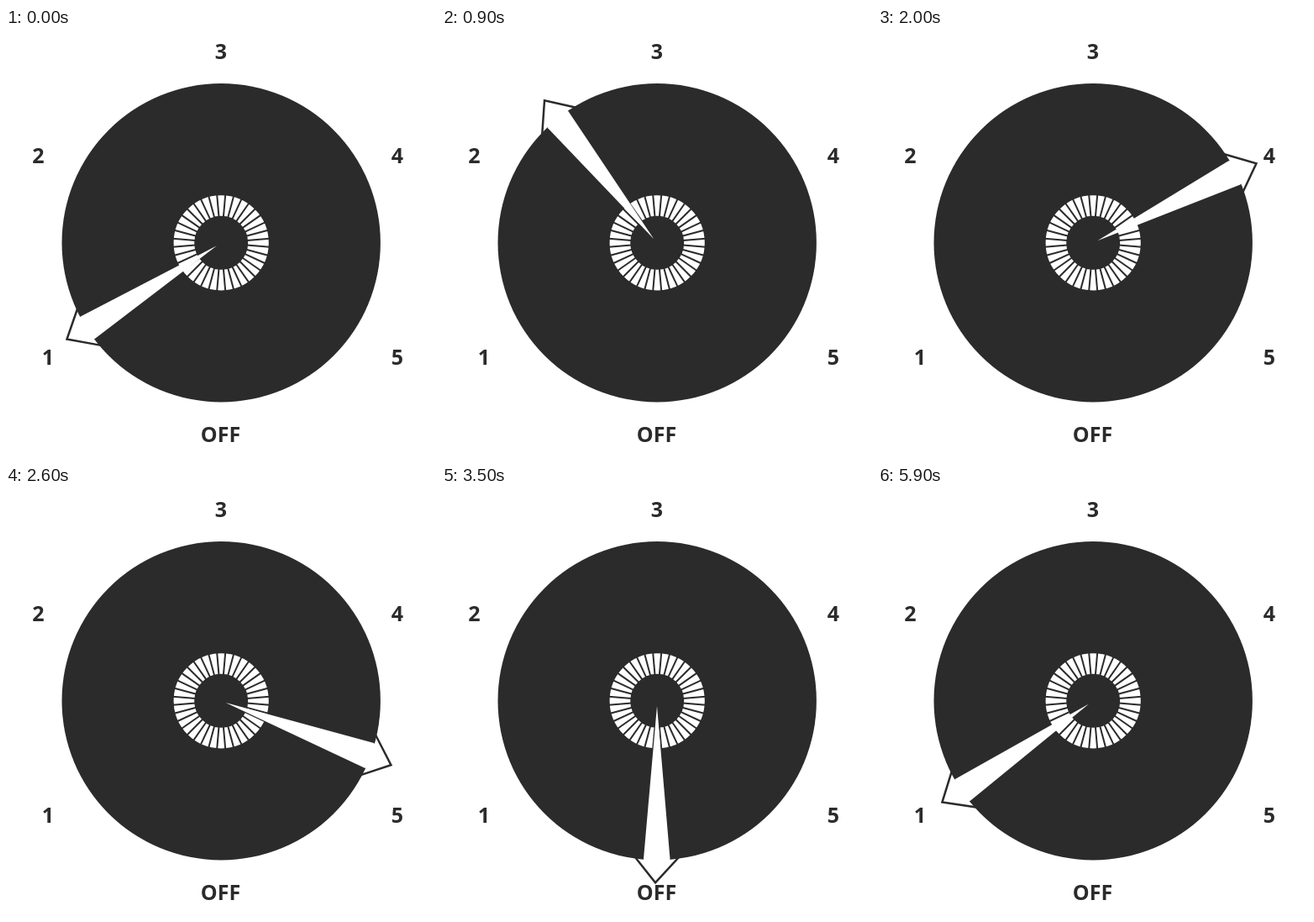
An HTML page for the animation above (6 s loop, 512 by 512 pixels).

```html
<!DOCTYPE html>
<html lang="en">
<head>
<meta charset="utf-8">
<title>Dial</title>
<style>
  html, body { margin: 0; width: 100%; height: 100%; overflow: hidden; background: #fff; }
  svg { display: block; width: 100%; height: 100%; }
  text { font: 700 25px "Open Sans", "Noto Sans", sans-serif; text-anchor: middle; fill: #2b2b2b; }
</style>
</head>
<body>
<svg viewBox="0 0 512 512">
  <g class="hand">
    <path d="M230 442L254 472.3L282 442Z" fill="#fff" stroke="#2b2b2b" stroke-width="2.5"/>
  </g>
  <circle cx="256.2" cy="255.8" r="189.7" fill="#2b2b2b"/>
  <circle cx="256.2" cy="255.8" r="44.3" fill="none" stroke="#fff" stroke-width="24.6"/>
  <g id="ticks" stroke="#2b2b2b" stroke-width="2"></g>
  <g class="hand">
    <path d="M256 262L240 444L243 452H268L271.5 444Z" fill="#fff"/>
  </g>
  <text x="50" y="401">1</text>
  <text x="38.5" y="161">2</text>
  <text x="256" y="37">3</text>
  <text x="466" y="161">4</text>
  <text x="466" y="401">5</text>
  <text x="255.5" y="493">OFF</text>
</svg>
<script>
  const LOOP = 6000, STEP = 100, TICKS = 36;
  const linear = u => u;
  const soft = u => 0.07 * u + 0.93 * u * u * (3 - 2 * u);

  // start ms, end ms, start angle, end angle (clockwise from OFF), easing
  const moves = [
    [0, 2000, 57.5, 243.5, linear],
    [2000, 3500, 243.5, 360, linear],
    [3500, 5000, 360, 360, linear],
    [5000, 6000, 360, 417.5, soft]
  ];

  const ticks = document.getElementById("ticks");
  for (let i = 0; i < TICKS; i++) {
    const line = document.createElementNS("http://www.w3.org/2000/svg", "path");
    line.setAttribute("d", "M256.2 198V225");
    line.setAttribute("transform", `rotate(${(i + 0.5) * 360 / TICKS} 256.2 255.8)`);
    ticks.append(line);
  }

  const hands = document.querySelectorAll(".hand");

  function angleAt(t) {
    const [from, to, a, b, ease] = moves.find(m => t < m[1]);
    return a + (b - a) * ease((t - from) / (to - from));
  }

  const start = performance.now();
  function draw(now) {
    const t = Math.floor(Math.max(0, now - start) % LOOP / STEP) * STEP;
    const turn = `rotate(${angleAt(t)} 256 256)`;
    hands.forEach(h => h.setAttribute("transform", turn));
    requestAnimationFrame(draw);
  }
  draw(start);
</script>
</body>
</html>
```
